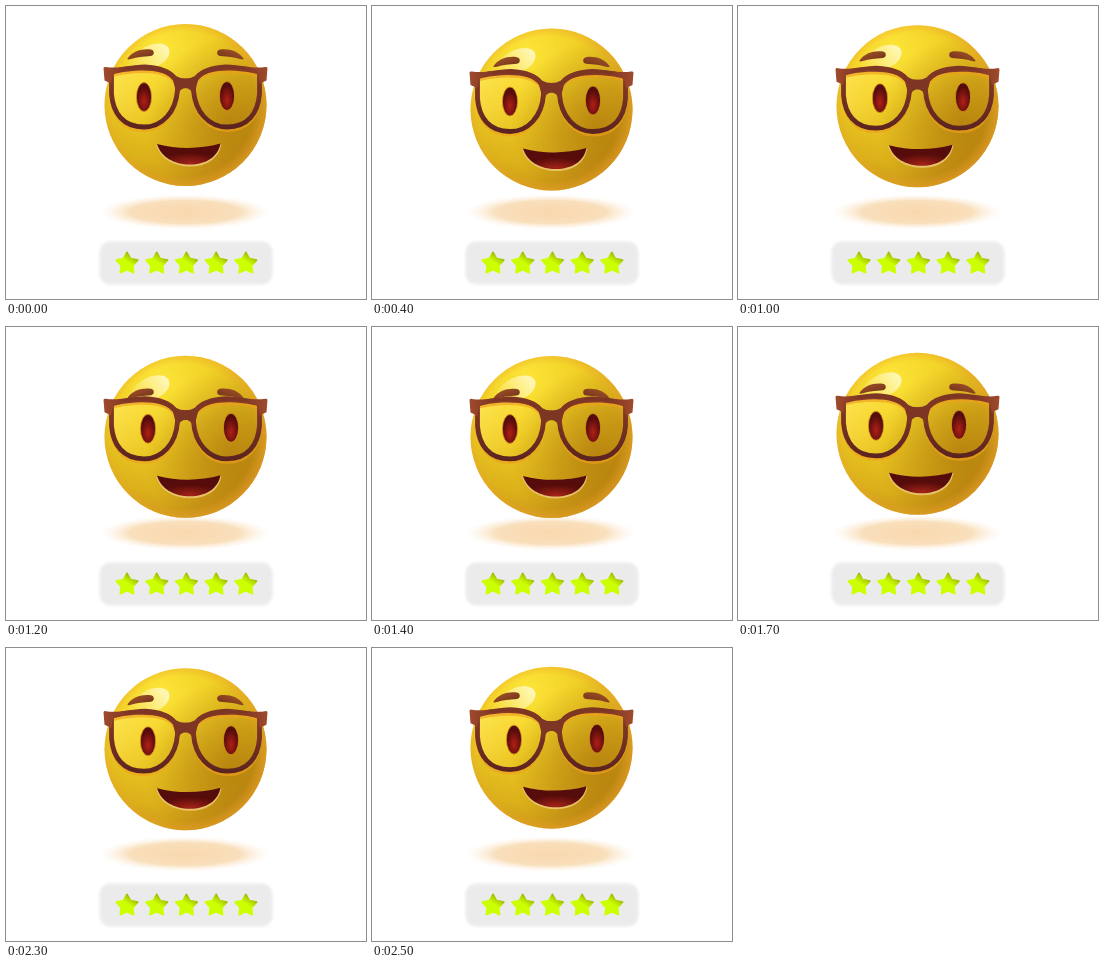
An HTML page that plays this animation: 360x293 px, repeating every 2.6 s.

```html
<!DOCTYPE html>
<html lang="en">
<head>
<meta charset="utf-8">
<title>Bouncing smiley</title>
<style>
  html, body { margin: 0; width: 100%; height: 100%; overflow: hidden; background: #fff; }
  svg { display: block; width: 360px; height: 293px; }
</style>
</head>
<body>
<svg viewBox="0 0 360 293">
  <defs>
    <radialGradient id="skin" gradientUnits="userSpaceOnUse" cx="155" cy="42" r="150">
      <stop offset="0" stop-color="#fde538"/>
      <stop offset=".35" stop-color="#f1d026"/>
      <stop offset=".75" stop-color="#dbb01a"/>
      <stop offset="1" stop-color="#c48c16"/>
    </radialGradient>
    <radialGradient id="shade" gradientUnits="userSpaceOnUse" cx="224" cy="115" r="85">
      <stop offset="0" stop-color="#8f5200" stop-opacity=".48"/>
      <stop offset=".45" stop-color="#8f5200" stop-opacity=".3"/>
      <stop offset="1" stop-color="#8f5200" stop-opacity="0"/>
    </radialGradient>
    <radialGradient id="rim" gradientUnits="userSpaceOnUse" cx="177" cy="98" r="84">
      <stop offset=".86" stop-color="#eda32c" stop-opacity="0"/>
      <stop offset="1" stop-color="#eda32c" stop-opacity=".6"/>
    </radialGradient>
    <linearGradient id="shine" x1="1" y1="0" x2="0" y2=".4">
      <stop offset="0" stop-color="#fffbd8" stop-opacity=".92"/>
      <stop offset=".5" stop-color="#fff6b0" stop-opacity=".6"/>
      <stop offset="1" stop-color="#fff6a8" stop-opacity=".1"/>
    </linearGradient>
    <linearGradient id="glint" x2="1" y2=".5">
      <stop offset="0" stop-color="#ffe95c" stop-opacity=".85"/>
      <stop offset=".9" stop-color="#ffd93c" stop-opacity="0"/>
    </linearGradient>
    <linearGradient id="brown" x2="0" y2="1">
      <stop offset="0" stop-color="#8a3d25"/>
      <stop offset="1" stop-color="#5c2420"/>
    </linearGradient>
    <linearGradient id="bar">
      <stop offset="0" stop-color="#a04a2c"/>
      <stop offset=".3" stop-color="#7d3524"/>
    </linearGradient>
    <linearGradient id="hair" x2="1" y2="1">
      <stop offset="0" stop-color="#a5562a"/>
      <stop offset="1" stop-color="#6e2f18"/>
    </linearGradient>
    <radialGradient id="eye" cy=".65">
      <stop offset="0" stop-color="#b02015"/>
      <stop offset="1" stop-color="#560c0c"/>
    </radialGradient>
    <radialGradient id="mouth" cx=".52" cy=".95" r=".5">
      <stop offset="0" stop-color="#a32318"/>
      <stop offset="1" stop-color="#560c0a"/>
    </radialGradient>
    <radialGradient id="shadow">
      <stop offset="0" stop-color="#f8d8ae"/>
      <stop offset=".65" stop-color="#f9dfbb"/>
      <stop offset="1" stop-color="#fdf0e0" stop-opacity="0"/>
    </radialGradient>
    <linearGradient id="lime" x1=".85" y1="0" x2=".3" y2=".8">
      <stop offset="0" stop-color="#838c08"/>
      <stop offset=".35" stop-color="#b2d800"/>
      <stop offset=".6" stop-color="#ccff00"/>
    </linearGradient>
    <filter id="soft"><feGaussianBlur stdDeviation="1.6"/></filter>
    <path id="lens" d="M105.500 66C118 62.500 140 60 156 64.500C166 67 172.500 74 171.500 84C170 106 156 121 138 121C117 121 107 107 105.500 88Z"/>
    <path id="brow" fill="url(#hair)" d="M121.500 52.500C126 45 137 42 145 43.500C149 44.500 148.500 49.500 145 50C137 50.500 131 51 125 53Q121 54 121.500 52.500Z"/>
    <path id="lips" d="M151 138Q183 146 214.500 137.500C212 151 200 158.500 184 158.500C168 158.500 155 151 151 138Z"/>
    <g id="half">
      <use href="#lens" y="3" fill="none" stroke="#f0a01c" stroke-opacity=".65" stroke-width="4"/>
      <use href="#lens" fill="none" stroke="url(#brown)" stroke-width="4.8"/>
      <path fill="url(#bar)" d="M97.500 62Q98 60.500 100 61C112 63 122 59 139 58.500C155 59 165 64 170 70Q174 72.500 180 72.500V82Q174 82 171 90L167 74C158 64 140 62 125 63.500C117 64.500 110 66 107 69L105 78Q103 76 98.500 74.500Z"/>
    </g>
    <path id="star" stroke-width="1.6" stroke-linejoin="round" fill="url(#lime)" stroke="url(#lime)"/>
  </defs>

  <ellipse cx="179" cy="206" rx="85" ry="17.500" fill="url(#shadow)"/>
  <rect x="93.500" y="235.500" width="173" height="43" rx="11" fill="#ebebeb" filter="url(#soft)"/>
  <g id="stars"></g>

  <g id="head">
    <circle cx="179.500" cy="99" r="81" fill="url(#skin)"/>
    <circle cx="179.500" cy="99" r="81" fill="url(#shade)"/>
    <circle cx="179.500" cy="99" r="81" fill="url(#rim)"/>
    <path fill="url(#shine)" d="M118 66C124 48 140 37 154 37.500C167 39 165 50 158 56C150 62 142 63 134 66Z"/>
    <g id="brows">
      <use href="#brow"/>
      <use href="#brow" transform="translate(359) scale(-1 1)"/>
    </g>
    <use href="#lens" fill="url(#glint)"/>
    <use href="#half"/>
    <use href="#half" transform="translate(359) scale(-1 1)"/>
    <g id="eyes" fill="url(#eye)" stroke="#d99a1c" stroke-width=".8">
      <ellipse cx="138" cy="91" rx="7.600" ry="14.500"/>
      <ellipse cx="221" cy="90" rx="7.600" ry="14.500"/>
    </g>
    <use href="#lips" y="1.200" fill="#e8c268" stroke="#e8c268" stroke-width="1.600" stroke-linejoin="round"/>
    <use href="#lips" fill="url(#mouth)"/>
  </g>
</svg>
<script>
const LOOP = 2600, STEP = 100, GLANCE = 1300;
const $ = id => document.getElementById(id);

const points = Array.from({ length: 10 }, (_, i) => {
  const r = i % 2 ? 6.2 : 11.3, a = i * Math.PI / 5;
  return `${(r * Math.sin(a)).toFixed(2)} ${(-r * Math.cos(a)).toFixed(2)}`;
});
$('star').setAttribute('d', `M${points.join('L')}Z`);
$('stars').innerHTML = [0, 1, 2, 3, 4]
  .map(i => `<use href="#star" x="${121 + i * 29.7}" y="257.6"/>`).join('');

const smooth = p => (1 - Math.cos(Math.PI * p)) / 2;
const easeOut = power => p => 1 - (1 - p) ** power;

// Crouch, jump, land low, drift back up: [start, end, from, to, easing]
const moves = [
  [0, 600, 0, 6, smooth],
  [600, 800, 6, -18, smooth],
  [800, 1300, -18, 12, easeOut(2)],
  [1300, LOOP, 12, 0, easeOut(1.15)]
];

function height(t) {
  const [start, end, from, to, ease] = moves.find(m => t < m[1]);
  return from + (to - from) * ease((t - start) / (end - start));
}

function shift(id, x, y) {
  $(id).setAttribute('transform', `translate(${x} ${y})`);
}

function draw(now) {
  const t = Math.floor(now % LOOP / STEP) * STEP;
  const y = height(t);
  shift('head', 0, y);
  shift('brows', 0, Math.max(0, y * 0.7));
  shift('eyes', t % GLANCE < 800 ? 0 : 4, 0);
}

const begin = performance.now();
function tick() {
  draw(performance.now() - begin);
  requestAnimationFrame(tick);
}
tick();
</script>
</body>
</html>
```
